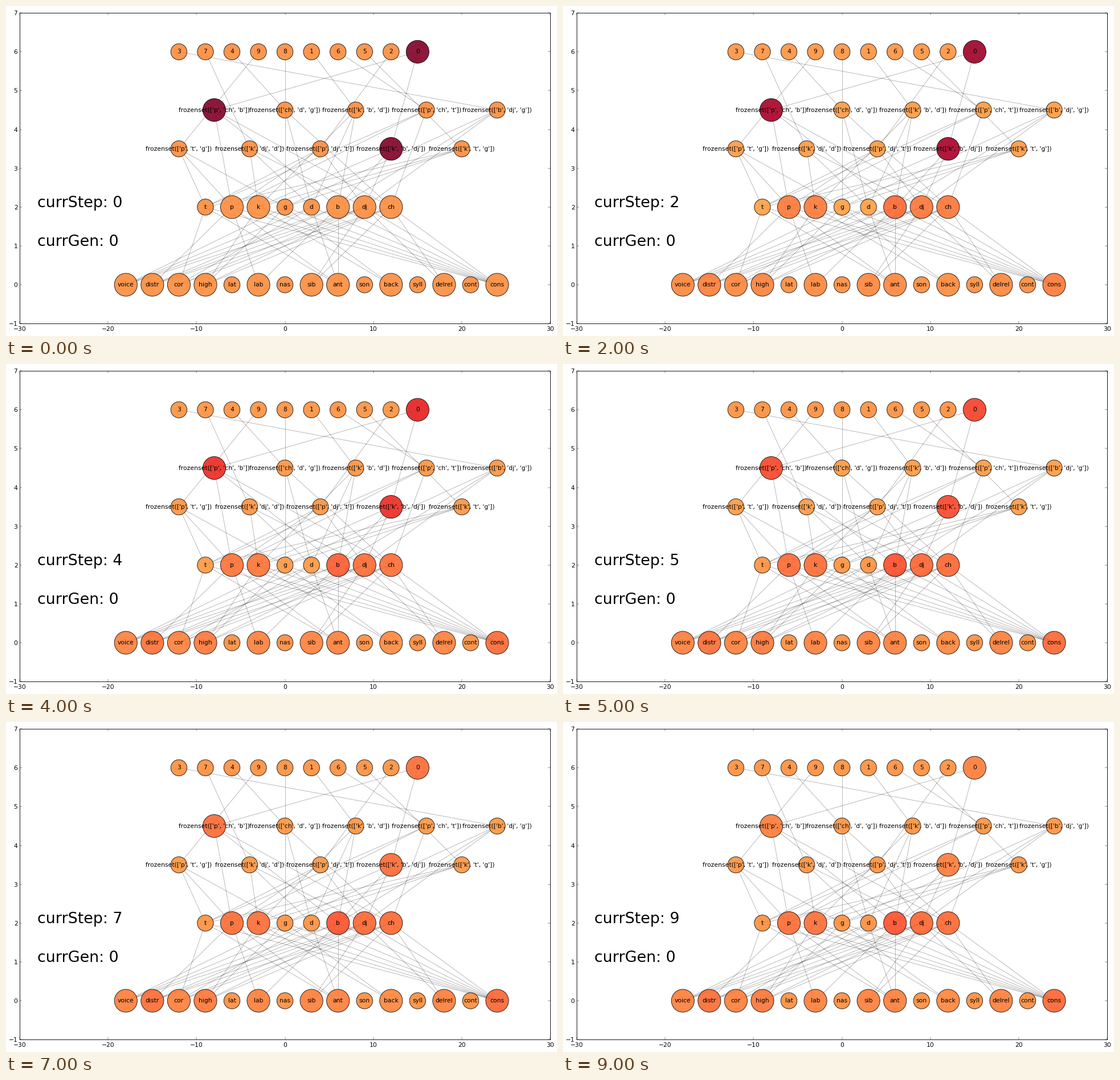
These frames come from a looping animation (967 by 579 pixels, 10000 ms). A matplotlib script:

```python
import matplotlib.pyplot as plt
from matplotlib.animation import FuncAnimation

W, H, DPI = 967, 579, 64
K = 64.6 / DPI          # point scale
ALPHA = 0.9
CMAP = plt.get_cmap("YlOrRd")

plt.rcParams["font.family"] = "DejaVu Sans"

MEANINGS = "3 7 4 9 8 1 6 5 2 0".split()
UPPER = ["p ch b", "ch d g", "k b d", "p ch t", "b dj g"]
LOWER = ["p t g", "k dj d", "p dj t", "k b dj", "k t g"]
PHONES = "t p k g d b dj ch".split()
FEATURES = ("voice distr cor high lat lab nas sib ant son back syll "
            "delrel cont cons").split()

WORDS = {"3": ["b dj g"], "7": ["k dj d"], "4": ["ch d g"], "9": ["p t g"],
         "8": ["ch d g"], "1": ["k b d"], "6": ["p ch t"], "5": ["k t g"],
         "2": ["p dj t"], "0": ["p ch b", "k b dj"]}

TRAITS = {"t": "cor ant cons", "p": "distr lab ant cons",
          "k": "high back cons", "g": "voice high back cons",
          "d": "voice cor ant cons", "b": "voice distr lab ant cons",
          "dj": "voice distr cor high sib delrel cons",
          "ch": "distr cor high sib delrel cons"}
TRAITS = {p: names.split() for p, names in TRAITS.items()}

# How many active neighbours feed each phone and each feature
ACTIVE = WORDS["0"]
PHONE_FEED = {p: sum(p in w.split() for w in ACTIVE) for p in PHONES}
TRAIT_FEED = {t: sum(t in TRAITS[p] for p in PHONES if PHONE_FEED[p])
              for t in FEATURES}


def row(names, kind, x0, dx, y):
    return {(kind, n): (x0 + dx * i, y) for i, n in enumerate(names)}


pos = {}
pos.update(row(MEANINGS, "meaning", -12, 3, 6))
pos.update(row(UPPER, "word", -8, 8, 4.5))
pos.update(row(LOWER, "word", -12, 8, 3.5))
pos.update(row(PHONES, "phone", -9, 3, 2))
pos.update(row(FEATURES, "trait", -18, 3, 0))
nodes = list(pos)

edges = [(("meaning", m), ("word", w)) for m in MEANINGS for w in WORDS[m]]
edges += [(("word", w), ("phone", p)) for w in UPPER + LOWER for p in w.split()]
edges += [(("phone", p), ("trait", t)) for p in PHONES for t in TRAITS[p]]


def is_big(kind, name):
    if kind == "meaning":
        return name == "0"
    if kind == "word":
        return name in ACTIVE
    return (PHONE_FEED if kind == "phone" else TRAIT_FEED)[name] > 0


def fade(step, half, power):
    return 0.5 / (1 + (step / half) ** power)


def ripple(step):
    """Decaying dip that is stronger on odd steps."""
    if step < 1:
        return 0
    return 0.75 ** (step - 1) * (1 if step % 2 else 0.4)


def bounce(step):
    """Rise from 0 that overshoots and settles at 1."""
    return 1 - (-0.6) ** step


def level(kind, name, step):
    big = is_big(kind, name)
    if kind == "meaning":
        shift = fade(step, 3.9, 3) if big else -0.02 * ripple(step - 1)
    elif kind == "word":
        shift = fade(step, 3.6, 2.7) if big else -0.135 * ripple(step)
    elif kind == "phone":
        gain = 0.05 * PHONE_FEED[name] + 0.004 * len(TRAITS[name])
        shift = gain * bounce(step) if big else -0.06 * ripple(step - 1)
    else:
        shift = 0.017 * TRAIT_FEED[name] * (1 - 0.5 ** max(step - 1, 0))
    return 0.5 + shift


def colors(step):
    rgba = CMAP([level(*n, step) for n in nodes])
    rgba[:, 3] = ALPHA
    return rgba


def label(kind, name):
    if kind != "word":
        return name
    return "frozenset([" + ", ".join(f"'{p}'" for p in name.split()) + "])"


fig = plt.figure(figsize=(W / DPI, H / DPI), dpi=DPI, facecolor="white")
ax = fig.add_axes([24.1 / W, 21.8 / H, 931 / W, 545 / H])
ax.set(xlim=(-30, 30), ylim=(-1, 7),
       xticks=range(-30, 31, 10), yticks=range(-1, 8))
ax.tick_params(direction="in", top=True, right=True, length=4 * K,
               width=0.5 * K, labelsize=12 * K, pad=4 * K)
ax.tick_params(axis="x", pad=5.6 * K)
for spine in ax.spines.values():
    spine.set_linewidth(K)

for a, b in edges:
    (xa, ya), (xb, yb) = pos[a], pos[b]
    ax.plot([xa, xb], [ya, yb], color="black", alpha=0.3, lw=K, zorder=1)

xs, ys = zip(*pos.values())
sizes = [(2000 if is_big(*n) else 1000) * K ** 2 for n in nodes]
dots = ax.scatter(xs, ys, s=sizes, c=colors(0), linewidths=K,
                  edgecolors=(0, 0, 0, ALPHA), zorder=2.5)
for n, (x, y) in pos.items():
    ax.text(x, y, label(*n), size=12 * K, ha="center", va="center", zorder=4)

step_text = ax.text(-28, 2, "currStep: 0", size=30 * K, zorder=4)
ax.text(-28, 1, "currGen: 0", size=30 * K, zorder=4)


def update(step):
    dots.set_facecolor(colors(step))
    step_text.set_text(f"currStep: {step}")
    return dots, step_text


anim = FuncAnimation(fig, update, frames=10, interval=1000, repeat=True,
                     repeat_delay=0, cache_frame_data=False)
plt.show()
```
